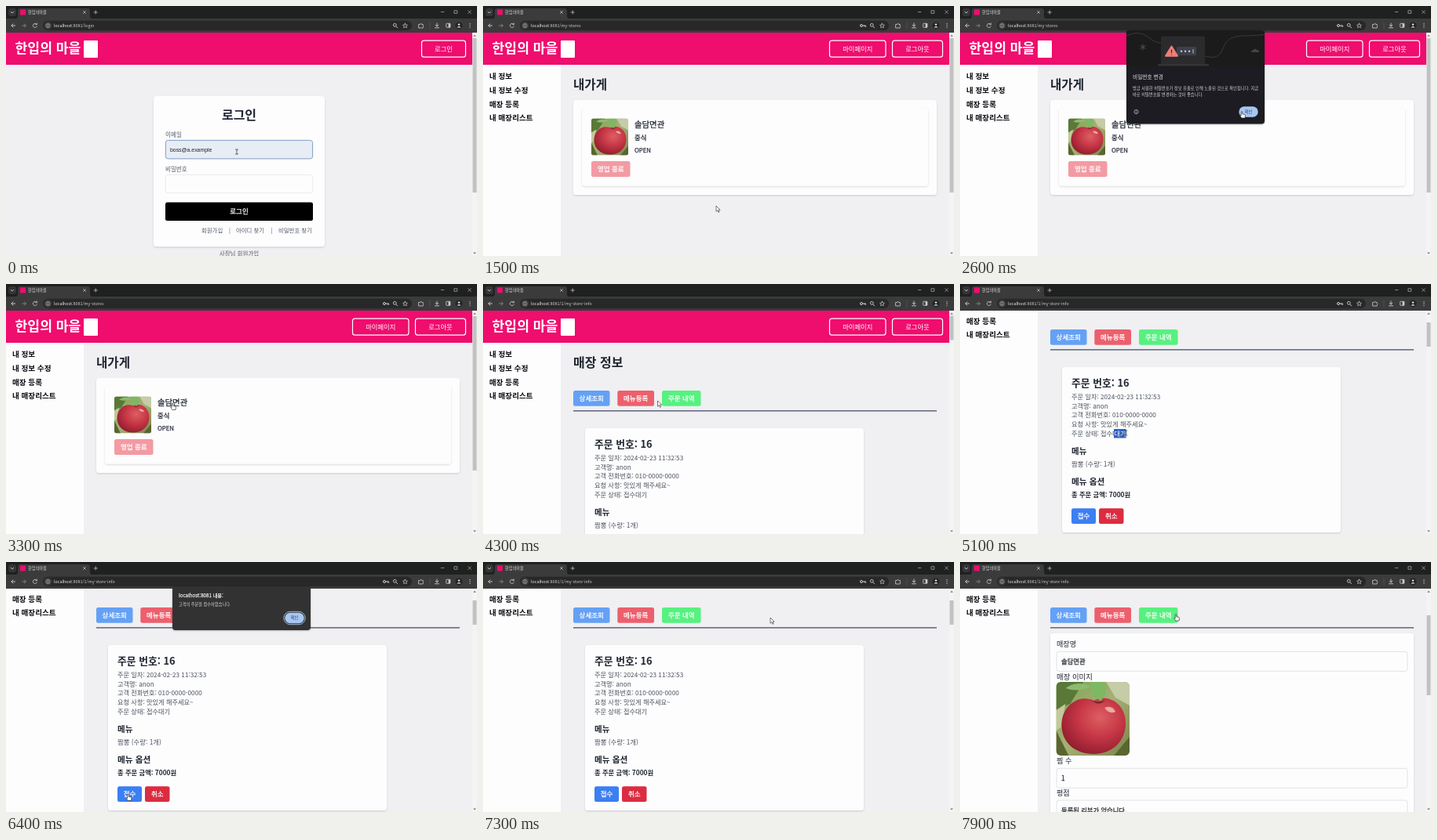
An HTML page for the animation above (8000 ms loop, 600 px wide and 319 px high).

```html
<!DOCTYPE html>
<html lang="ko">
<head>
<meta charset="utf-8">
<style>
  html, body { margin: 0; width: 100%; height: 100%; overflow: hidden; background: #f1f0f3; }
  svg { display: block; width: 100vw; height: 100vh; }
  text { font-family: "Noto Sans CJK KR", "Noto Sans CJK JP", "Noto Sans CJK", "Noto Sans", sans-serif; white-space: pre; }
</style>
</head>
<body>
<svg id="stage" viewBox="0 0 600 319"></svg>
<script>
const LOOP = 8000;
const STORE = '솔담면관';
const INK = '#1f2530', GRAY = '#535a66', PINK = '#ef0d6e', ICON = '#d0d0d2';

// Text is placed by its vertical centre; a thin outline stands in for medium weight.
const text = (x, cy, size, str, fill = INK, weight = 400, extra = '') =>
  `<text x="${x}" y="${cy + size * 0.36}" font-size="${size}" fill="${fill}" font-weight="${weight}"
    ${weight === 500 ? `stroke="${fill}" stroke-width=".25"` : ''} ${extra}>${str}</text>`;
const mid = (x, cy, size, str, fill, weight) => text(x, cy, size, str, fill, weight, 'text-anchor="middle"');
const box = (x, y, w, h, fill, r = 0, extra = '') =>
  `<rect x="${x}" y="${y}" width="${w}" height="${h}" rx="${r}" fill="${fill}" ${extra}/>`;
const line = (d, color, width = 0.9) =>
  `<path d="${d}" fill="none" stroke="${color}" stroke-width="${width}" stroke-linecap="round" stroke-linejoin="round"/>`;
const shape = (d, fill) => `<path d="${d}" fill="${fill}"/>`;
const dot = (x, y, r, fill) => `<circle cx="${x}" cy="${y}" r="${r}" fill="${fill}"/>`;
const ring = (x, y, r, color, width) =>
  `<circle cx="${x}" cy="${y}" r="${r}" fill="none" stroke="${color}" stroke-width="${width}"/>`;
const group = (id, body) => `<g id="${id}">${body}</g>`;
const card = (x, y, w, h) => box(x, y, w, h, '#fdfdfe', 4, 'filter="url(#shadow)"');
const button = (x, y, w, h, fill, label) =>
  box(x, y, w, h, fill, 2.5) + mid(x + w / 2, y + h / 2, 8.5, label, '#fff', 500);
const field = (y, value) =>
  box(123, y, 447, 25, '#fdfdfe', 3, 'stroke="#dcdfe5" stroke-width=".9"') + text(129, y + 12.7, 8.3, value, '#22262e', 500);
const photo = (x, y, w, h) => `<use href="#apple" x="${x}" y="${y}" width="${w}" height="${h}"/>`;

const defs = `<defs>
  <filter id="shadow" x="-5%" y="-10%" width="110%" height="125%">
    <feDropShadow dx="0" dy="1.2" stdDeviation="1.3" flood-color="#000" flood-opacity=".14"/></filter>
  <filter id="deep" x="-10%" y="-10%" width="120%" height="130%">
    <feDropShadow dx="0" dy=".5" stdDeviation="1" flood-color="#000" flood-opacity=".3"/></filter>
  <radialGradient id="skin" cx=".6" cy=".35" r=".7">
    <stop offset="0" stop-color="#dd5f62"/><stop offset=".5" stop-color="#c63645"/><stop offset="1" stop-color="#8f1c2e"/></radialGradient>
  <linearGradient id="grass" x2="1" y2="1">
    <stop offset="0" stop-color="#7ba450"/><stop offset=".5" stop-color="#a5b075"/><stop offset="1" stop-color="#7c8449"/></linearGradient>
  <clipPath id="round"><rect width="94" height="94" rx="6"/></clipPath>
  <clipPath id="banner"><rect x="212" y="32" width="176" height="46"/></clipPath>
  <symbol id="apple" viewBox="0 0 94 94" preserveAspectRatio="none"><g clip-path="url(#round)">
    <rect width="94" height="94" fill="url(#grass)"/>
    ${shape('M0 0H35L18 28 0 36z', '#5a7838') + shape('M64 0H94V30L76 20z', '#c6cba8')}
    ${shape('M0 62L16 94H0zM94 70L74 94H94z', '#59662f') + shape('M0 36L12 28 6 58 0 62z', '#c2c99a')}
    ${shape('M48 24C62 14 90 25 89 54C88 78 70 92 48 92C25 92 7 78 7 55C7 29 31 15 48 24z', 'url(#skin)')}
    ${shape('M43 21q9 8 20 2q-9 10-20-2z', '#6b2428') + shape('M62 33q9-4 14 5q-8 4-14-5z', '#ecaaa4')}
    ${shape('M44 0H61Q68 14 57 24Q43 18 44 0z', '#7db863') + shape('M12 8Q27-3 44 6Q28 14 12 8z', '#8dba70')}
  </g></symbol>
</defs>`;

const header = labels => box(0, 34, 594, 41, PINK) +
  text(11.5, 54.2, 17.2, '한입의 마을', '#fff', 900) + box(99, 44, 18, 22, '#fff', 1) +
  labels.map(([x, w, label]) => box(x, 44.2, w, 21, 'none', 3, 'stroke="#fff" stroke-width="1.2"') +
    mid(x + w / 2, 54.8, 8.3, label, '#fff')).join('');
const memberHeader = header([[441.5, 71.5, '마이페이지'], [521.5, 64, '로그아웃']]);
const sidebar = box(0, 75, 99, 420, '#fdfdfe') +
  ['내 정보', '내 정보 수정', '매장 등록', '내 매장리스트'].map((s, i) => text(8, 89.7 + i * 17.7, 9.6, s, '#0c0d12', 600)).join('');

const loginPage = header([[529.5, 56, '로그인']]) + card(188, 115, 218, 192) +
  mid(297, 139.5, 16, '로그인', INK, 700) +
  text(203, 164.3, 7.6, '이메일', GRAY) +
  box(203.4, 171.4, 187.2, 23.5, '#e7ecf5', 3, 'id="email" stroke-width=".9"') +
  text(209, 184, 6.9, 'boss@a.example', '#20242c', 400, 'style="font-family:\'Liberation Sans\',sans-serif"') +
  text(203, 208, 7.5, '비밀번호', GRAY) +
  box(203.4, 215.4, 187.2, 23.2, '#fdfdfe', 3, 'id="password" stroke-width=".9"') +
  group('dots', [211, 215, 219, 223].map(x => dot(x, 227, 1.3, '#20242c')).join('')) +
  button(203, 250.5, 188, 23.5, '#000', '로그인') +
  text(249, 286.8, 7.4, '회원가입', GRAY) + mid(285, 286.5, 7.4, '|', GRAY) +
  text(293, 286.8, 7.4, '아이디 찾기', GRAY) + mid(338.5, 286.5, 7.4, '|', GRAY) +
  text(347, 286.8, 7.4, '비밀번호 찾기', GRAY) + mid(297, 316, 7.5, '사장님 회원가입', GRAY);

const storesPage = memberHeader + sidebar + text(115, 100, 15.6, '내가게', INK, 600) +
  card(115, 120, 463, 121) + card(126, 130, 441, 99.5) + photo(138, 143.5, 47, 47) +
  text(193, 151, 10.4, STORE, INK, 500) + text(193, 168, 8.3, '중식', INK, 500) + text(193, 184, 7.8, 'OPEN', '#2c323d', 500) +
  button(138, 198, 49.5, 20, '#f39aa3', '영업 종료');

const orderLines = ['주문 일자: 2024-02-23 11:32:53', '고객명: anon', '고객 전화번호: 010-0000-0000', '요청 사항: 맛있게 해주세요~', '주문 상태: 접수대기'];
const orders = card(130, 184, 355, 211) + text(142, 204.5, 12.8, '주문 번호: 16', INK, 600) +
  box(196, 263, 15.6, 11.5, '#2d62c8', 0, 'id="selection"') +
  orderLines.map((s, i) => text(142, 222 + i * 11.7, 8.2, s, '#4a515c')).join('') +
  text(196.4, 268.8, 8.2, '대기', '#fff', 400, 'id="selected"') +
  text(142, 291, 10.5, '메뉴', INK, 600) + text(142, 308, 8.4, '짬뽕 (수량: 1개)', '#4a515c') +
  text(142, 330, 10.7, '메뉴 옵션', INK, 600) + text(142, 347, 8.3, '총 주문 금액: 7000원', INK, 700) +
  button(142, 364.3, 31, 19.7, '#3b7ff2', '접수') + button(177, 364.3, 31.5, 19.7, '#dc2c40', '취소');

const details = card(115, 169, 463, 300) +
  text(123, 183, 9.1, '매장명') + field(192.3, STORE) +
  text(123, 224.2, 9.4, '매장 이미지') + photo(122.5, 231, 93.5, 94) +
  text(123, 332, 9.1, '찜 수') + field(341.3, '1') +
  text(123, 373, 9.1, '평점') + field(382, '등록된 리뷰가 없습니다.');

const infoPage = memberHeader + sidebar + text(115, 100, 16, '매장 정보', INK, 600) +
  button(115, 136, 46.5, 19.7, '#64a1f5', '상세조회') + button(171.3, 136, 46.7, 19.7, '#ec606d', '메뉴등록') +
  button(228, 136, 49.5, 19.7, '#57f180', '주문 내역') + box(115, 161, 463, 1.7, '#6b7686') +
  group('orders', orders) + group('details', details);

const scrollbar = box(594, 34, 6, 285, '#f4f4f5') + box(594.5, 41, 5, 197, '#c1c1c3', 0, 'id="thumb"') +
  shape('M595 38.8l2-2 2 2zM595 314.5l2 2 2-2z', '#77777a');

const tabStrip = box(0, 0, 600, 16.5, '#1f2020') + box(3, 3, 10, 10, '#343536', 3) + line('M6.2 7.3l1.8 1.8 1.8-1.8', ICON) +
  shape('M11 16.5q4 0 4-4V6q0-3 3-3H104q3 0 3 3v6.5q0 4 4 4z', '#3b3b3c') +
  box(18, 4.5, 7, 7, PINK, 1) + text(28, 8.2, 5.2, '한입의마을', '#e4e4e6') +
  line('M98.5 6.5l3 3m0-3l-3 3', ICON, 0.7) + line('M112 8h4.4m-2.2-2.2v4.4', ICON, 0.7) +
  line('M554.3 7.6h3.6M571.3 5.8h3.5v3.5h-3.5zM588.7 5.8l3.7 3.7m0-3.7l-3.7 3.7', ICON, 0.6);
const addressBar = box(0, 16, 600, 18, '#3b3b3c') + box(47, 18.8, 470, 12.4, '#282829', 6.2) +
  line('M11.6 25H7m2.1-2.1L6.9 25 9.100 27.1', ICON) + line('M20.7 25h4.600m-2.1-2.1l2.2 2.1-2.2 2.1', '#858587') +
  line('M39 23.3A2.6 2.6 0 1 0 39.4 26M39.4 22v1.700h-1.700', ICON, 0.8) +
  dot(53.5, 25, 5, '#3b3b3c') + line('M53.5 24.8v1.500M53.5 23.5v.1', ICON, 0.7) + ring(53.5, 25, 2.5, ICON, 0.6) +
  '<text x="61" y="27" font-size="5.4" fill="#f0f0f1">localhost<tspan id="path" fill="#cbcbcd"></tspan></text>' +
  group('key', ring(482, 25, 1.5, ICON, 1) + line('M483.6 25h4v1.4M486 25v1.2', ICON)) +
  ring(495.3, 24.3, 1.9, ICON, 0.9) + line('M496.8 25.9l2 2', ICON) +
  line('M508.5 22.2l.9 1.900 2 .2-1.500 1.400.5 2-1.900-1-1.900 1 .5-2-1.500-1.400 2-.2z', ICON, 0.7) +
  line('M526 23.5h1.600a1 1 0 0 1 2 0h1.600v1.500a1 1 0 0 1 0 1.800V28H526z', ICON, 0.8) + line('M540 21v8', '#5c5c5f', 0.6) +
  line('M549 22v4m-1.800-1.700L549 26l1.800-1.700M546.5 27.8h5', ICON) +
  box(560.7, 22.3, 5.2, 5, 'none', 0.6, `stroke="${ICON}" stroke-width=".8"`) + box(563.6, 22.3, 2.3, 5, ICON) +
  dot(577, 25, 4.6, '#262627') + dot(577, 23.6, 1.2, '#ececee') + shape('M574.3 27.5q2.700-3 5.400 0z', '#ececee') +
  [22.7, 25, 27.3].map(y => dot(591, y, 0.65, ICON)).join('');

const okPill = y => box(355.3, y + 0.3, 24.4, 13.4, '#a9c6f3', 6.7) + mid(367.5, y + 7, 5.2, '확인', '#243b63');
const triangle = 'M269.5 51.5l7.5 12.2h-15z';
const illustration = '<g clip-path="url(#banner)">' + box(212, 32, 176, 46, '#1b1b1c') +
  line('M212 38Q228 30 240 40T262 46M312 64Q330 70 335 54T360 38T390 36', '#3d3e40') +
  box(256, 38.5, 56, 37, '#2b2b2d', 2) + box(252, 74, 65, 2.5, '#343537', 1) +
  line('M233 49v7m-3-5.3l6 3.6m0-3.600l-6 3.6', '#55575a') +
  shape('M371 59q0-3 3-3 2-3 4 0 3 0 3 3z', '#434548') + '</g>' +
  box(276, 52, 25, 11, '#3d4048', 1.5) + [282, 287, 292].map(x => dot(x, 57.7, 1.2, '#b3cbf1')).join('') +
  line('M297 55.5v4.5', '#e8e8ea', 0.8) + shape(triangle, '#ed7e78') + line(triangle + 'z', '#ed7e78', 2) +
  line('M269.5 56v3.5M269.5 62v.1', '#4b2222', 1.2);
const warning = box(212, 31, 176, 119.5, '#1f1f20', 4, 'filter="url(#deep)"') + illustration +
  text(220, 91, 6.7, '비밀번호 변경', '#e6e6e8') +
  text(220, 105.5, 5.27, '방금 사용한 비밀번호가 정보 유출로 인해 노출된 것으로 확인됩니다. 지금', '#d6d6d8') +
  text(220, 113.5, 5.27, '바로 비밀번호를 변경하는 것이 좋습니다.', '#d6d6d8') +
  ring(224.5, 135, 2.6, '#cfcfd2', 0.7) + line('M224.5 135v1.3M224.5 133.6v.1', '#cfcfd2', 0.7) + okPill(128);

const alertBox = box(212, 31, 176, 56, '#303132', 4, 'filter="url(#deep)"') +
  text(220, 42.3, 6.2, 'localhost:8081 내용:', '#e8e8ea', 500) +
  text(220, 54.3, 5.2, '고객의 주문을 접수하였습니다.', '#d8d8da') +
  box(353.8, 63.3, 27.4, 16.4, 'none', 8.2, 'stroke="#a9c4ee" stroke-width=".9"') + okPill(64.5);

const pointer =
  group('arrow', '<path d="M0 0v7.2l1.7-1.5 1.2 2.6 1.2-.5-1.2-2.6h2.3z" fill="#fff" stroke="#222" stroke-width=".6"/>') +
  group('hand', '<path d="M-.8.5q.8-1 1.6 0V3.3l3 .7q.8.3.7 1.2L4 8.5H-.2L-2.3 5.5q.3-1 1.5-.1z" fill="#fff" stroke="#111" stroke-width=".6"/>') +
  group('beam', line('M-1.5-3h1q.5 0 .5.5v5q0 .5-.5.5h-1M1.5-3h-1q-.5 0-.5.5M1.5 3h-1q-.5 0-.5-.5', '#23262c', 0.7));

document.getElementById('stage').innerHTML = defs + box(0, 34, 600, 285, '#f0eff2') +
  group('login', loginPage) + group('stores', storesPage) + group('info', infoPage) +
  scrollbar + tabStrip + addressBar + group('warning', warning) + group('alert', alertBox) + group('pointer', pointer);

const el = {};
document.querySelectorAll('#stage [id]').forEach(node => { el[node.id] = node; });
const show = (id, on) => { el[id].style.display = on ? '' : 'none'; };
const set = (id, attrs) => { for (const k in attrs) el[id].setAttribute(k, attrs[k]); };

const ease = (t, from, to) => {
  const k = Math.min(1, Math.max(0, (t - from) / (to - from)));
  return k * k * (3 - 2 * k);
};

// time, x, y of the pointer hot spot
const route = [
  [0, 294, 186], [100, 294, 186], [350, 294, 227], [650, 294, 227], [900, 297, 255], [1600, 297, 255],
  [1850, 338, 196], [2350, 359, 134.5], [2750, 359, 134.5], [3150, 212, 152], [3400, 212, 152],
  [3750, 250, 149], [4000, 250, 149], [4250, 222.5, 149], [4600, 222.5, 149], [4850, 196, 190],
  [4950, 196, 190], [5080, 211.5, 190], [5500, 211.5, 190], [6000, 155.5, 296], [6650, 155.5, 296],
  [7050, 366, 71], [7350, 366, 71], [7750, 275, 66.5], [8000, 275, 66.5]
];
const pointerAt = t => {
  const i = Math.max(1, route.findIndex(p => p[0] > t));
  const [a, b] = [route[i - 1], route[i]];
  const k = ease(t, a[0], b[0]);
  return [a[1] + (b[1] - a[1]) * k, a[2] + (b[2] - a[2]) * k];
};
const within = (t, spans) => spans.some(([from, to]) => t >= from && t < to);

function render(t) {
  const page = t < 1100 ? 'login' : t < 3450 ? 'stores' : 'info';
  ['login', 'stores', 'info'].forEach(id => show(id, id === page));
  el.path.textContent = ':8081/' + { login: 'login', stores: 'my-stores', info: '1/my-store-info' }[page];

  const passwordFocus = t >= 350;
  set('email', { stroke: passwordFocus ? '#e0e4ec' : '#7396bd' });
  set('password', { stroke: passwordFocus ? '#7396bd' : '#e9e9ed' });
  [...el.dots.children].forEach((d, i) => { d.style.display = t >= 450 + i * 80 ? '' : 'none'; });

  const ordersOpen = t >= 4000 && t < 7350;
  show('orders', ordersOpen);
  show('details', !ordersOpen);
  const scroll = 78 * ease(t, 4420, 4700);
  set('info', { transform: `translate(0 ${-scroll})` });
  const [top, height, travel] = page !== 'info' ? [41, 197, 0] : ordersOpen ? [40.5, 31, 8.5] : [41, 102, 27];
  set('thumb', { y: top + travel * scroll / 78, height });

  const drag = 15.6 * ease(t, 4950, 5080);
  const selecting = t > 4950 && t < 5500;
  show('selection', selecting);
  show('selected', selecting && drag > 8);
  set('selection', { width: drag });

  show('key', t >= 1100 && t < 7350);
  show('warning', t >= 1900 && t < 2800);
  show('alert', t >= 6400 && t < 7200);

  const [x, y] = pointerAt(t);
  const beam = within(t, [[0, 750], [4820, 5600]]);
  const hand = within(t, [[850, 1100], [2250, 2800], [3050, 3450], [3700, 4120], [5950, 6800], [7600, 8000]]);
  set('pointer', { transform: `translate(${x} ${y})` });
  show('beam', beam);
  show('hand', hand);
  show('arrow', !beam && !hand);
}

const start = performance.now();
function tick() {
  render((performance.now() - start) % LOOP);
  requestAnimationFrame(tick);
}
render(0);
requestAnimationFrame(tick);
</script>
</body>
</html>
```
